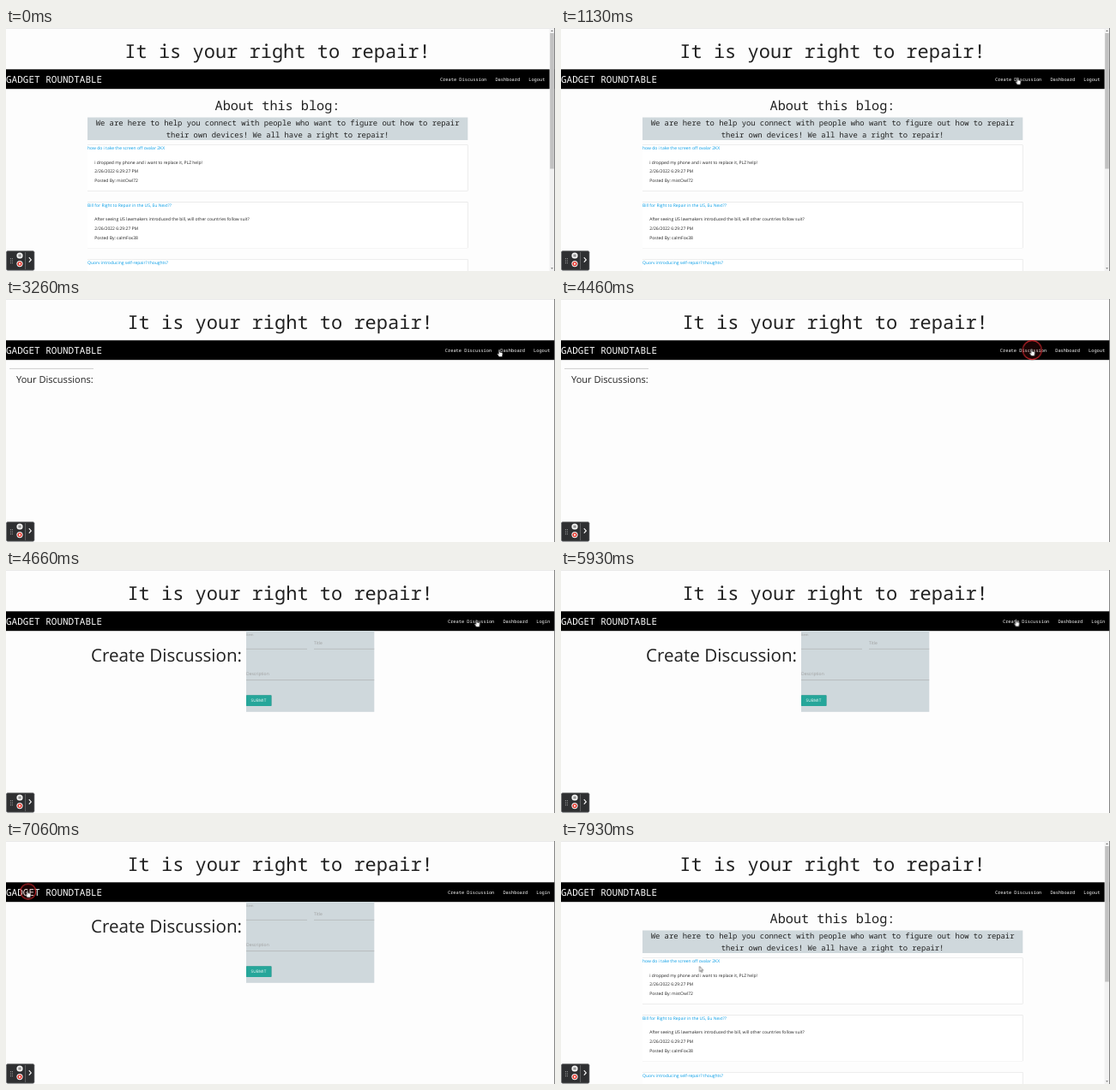
An HTML page for the animation above (8000 ms loop, 640x284 px).

```html
<!DOCTYPE html>
<html lang="en">
<head>
<meta charset="utf-8">
<title>Repair forum walkthrough</title>
<style>
  html, body { margin: 0; width: 100%; height: 100%; overflow: hidden; background: #fdfdfd; }
  svg { display: block; width: 100%; height: 100%; }
  text { font: 5px "Open Sans", "Noto Sans", sans-serif; fill: #212121; text-rendering: geometricPrecision; white-space: pre; }
  .mono text, text.mono { font-family: "Noto Sans Mono", "DejaVu Sans Mono", monospace; }
  .mid { text-anchor: middle; }
  text.hero { font-size: 22px; }
  text.about { font-size: 15.2px; }
  text.intro { font-size: 8.83px; }
  text.brand { font-size: 11px; fill: #fff; }
  .links text { font-size: 5.33px; fill: #fff; text-anchor: end; }
  text.link { fill: #039be5; }
  .card rect { fill: #fff; filter: drop-shadow(0 .7px .7px rgba(0, 0, 0, .32)); }
  .panel { fill: #cfd8dc; }
  .label { fill: #9e9e9e; }
  .rule { stroke: #9e9e9e; stroke-width: .5; }

  /* every animation shares one 8 s clock */
  .home, .dash, .create, .arrow, .hand, .pointer, .ring { animation: 8s linear infinite; }
  .home { animation-name: home; animation-timing-function: step-end; }
  .dash { animation-name: dash; animation-timing-function: step-end; }
  .create { animation-name: create; animation-timing-function: step-end; }
  .hand { animation-name: hand; animation-timing-function: step-end; }
  .arrow { animation-name: arrow; animation-timing-function: step-end; }
  .ring { animation-name: ring; animation-timing-function: step-end; fill: rgba(198, 30, 36, .12); stroke: #c3242a; stroke-width: 1.1; }
  .pointer { animation-name: move; }
  .pointer path { fill: #fff; stroke: #111; stroke-width: .5; stroke-linejoin: round; }

  @keyframes home {
    0% { visibility: visible; }
    31.625% { visibility: hidden; }
    90%, 100% { visibility: visible; }
  }
  @keyframes dash {
    0% { visibility: hidden; }
    31.625% { visibility: visible; }
    58.25%, 100% { visibility: hidden; }
  }
  @keyframes create {
    0% { visibility: hidden; }
    58.25% { visibility: visible; }
    90%, 100% { visibility: hidden; }
  }
  @keyframes move {
    0%, 2.5% { transform: translate(419px, 57.5px); }
    11.625%, 13.25% { transform: translate(528px, 57.5px); }
    23.25%, 43.25% { transform: translate(575px, 59px); }
    50.75%, 74.12% { transform: translate(548.5px, 58px); }
    74.125%, 75.75% { transform: translate(530.5px, 57.5px); }
    79% { transform: translate(300px, 43px); }
    83.25%, 90% { transform: translate(25px, 57.5px); }
    95.75% { transform: translate(280px, 90px); }
    99.125%, 100% { transform: translate(161.5px, 146.5px); }
  }
  @keyframes hand {
    0% { visibility: hidden; }
    9.35% { visibility: visible; }
    76% { visibility: hidden; }
    81.9% { visibility: visible; }
    92%, 100% { visibility: hidden; }
  }
  @keyframes arrow {
    0% { visibility: hidden; }
    .75% { visibility: visible; }
    9.35% { visibility: hidden; }
    76% { visibility: visible; }
    81.9% { visibility: hidden; }
    92%, 100% { visibility: visible; }
  }
  @keyframes ring {
    0% { r: 0; opacity: 0; }
    24.125% { r: 4px; opacity: 1; }
    25% { r: 9px; opacity: 1; }
    25.75% { r: 11.3px; opacity: 1; }
    28.25% { r: 6.3px; opacity: 1; }
    30% { r: 0; opacity: 0; }
    55.75% { r: 11px; opacity: 1; }
    58.25% { r: 0; opacity: 0; }
    85.75% { r: 3.5px; opacity: .75; }
    87.5% { r: 9px; opacity: 1; }
    88.4% { r: 11px; opacity: 1; }
    90%, 100% { r: 0; opacity: 0; }
  }
</style>
</head>
<body>
<svg viewBox="0 0 640 284">
  <rect width="640" height="284" fill="#fdfdfd"/>
  <path d="M0 .3H640" stroke="#d4d4d4" stroke-width=".6"/>
  <path d="M0 71.4H639" stroke="#000" stroke-opacity=".22" stroke-width="1"/>
  <rect y="48.3" width="639.3" height="22.7"/>

  <g class="home">
    <text class="mono hero mid" x="316.5" y="35">It is your right to repair!</text>
    <g class="links mono">
      <text x="560.3" y="61.7">Create Discussion</text>
      <text x="599.2" y="61.7">Dashboard</text>
      <text x="628.4" y="61.7">Logout</text>
    </g>
    <text class="mono about mid" x="316.5" y="95.5">About this blog:</text>
    <rect class="panel" x="95" y="104.5" width="443.3" height="26.5"/>
    <text class="mono intro mid" x="316.6" y="114.2">We are here to help you connect with people who want to figure out how to repair</text>
    <text class="mono intro mid" x="316.6" y="127.5">their own devices! We all have a right to repair!</text>

    <g class="card">
      <rect x="95" y="136.7" width="443.3" height="53.6"/>
      <text class="link" x="95" y="142.3">how do i take the screen off ovalar 2KX</text>
      <text x="103.3" y="158.5">i dropped my phone and i want to replace it, PLZ help!</text>
      <text x="103.3" y="169.2">2/26/2022 6:29:27 PM</text>
      <text x="103.3" y="179.9">Posted By: mistOwl72</text>
    </g>
    <g class="card">
      <rect x="95" y="203.5" width="443.3" height="53.6"/>
      <text class="link" x="95" y="209.1">Bill for Right to Repair in the US, Eu Next??</text>
      <text x="103.3" y="225.3">After seeing US lawmakers introduced the bill, will other countries follow suit?</text>
      <text x="103.3" y="236">2/26/2022 6:29:27 PM</text>
      <text x="103.3" y="246.7">Posted By: calmFox38</text>
    </g>
    <g class="card">
      <rect x="95" y="270.3" width="443.3" height="53.6"/>
      <text class="link" x="95" y="275.9">Quorv introducing self-repair? thoughts?</text>
    </g>

    <rect x="633.6" y=".6" width="5.7" height="283.4" fill="#f1f1f1"/>
    <rect x="634.2" y="6" width="4.6" height="158.5" fill="#c1c1c1"/>
    <path d="M635.2 4l1.3-1.6 1.3 1.6zM635.2 280.2l1.3 1.6 1.3-1.6z" fill="#606060"/>
  </g>

  <g class="dash">
    <text class="mono hero mid" x="319.6" y="35">It is your right to repair!</text>
    <g class="links mono">
      <text x="566.2" y="61.7">Create Discussion</text>
      <text x="605" y="61.7">Dashboard</text>
      <text x="634.2" y="61.7">Logout</text>
    </g>
    <path class="rule" d="M4 81.4H102"/>
    <text x="12" y="97.6" style="font-size:11.05px">Your Discussions:</text>
  </g>

  <g class="create">
    <text class="mono hero mid" x="319.6" y="35">It is your right to repair!</text>
    <g class="links mono">
      <text x="569.3" y="61.7">Create Discussion</text>
      <text x="608.2" y="61.7">Dashboard</text>
      <text x="634.2" y="61.7">Login</text>
    </g>
    <text x="99" y="107" style="font-size:20.6px">Create Discussion:</text>
    <rect class="panel" x="280" y="71" width="149.3" height="94.8"/>
    <text class="label" x="280" y="76.7" style="font-size:4px">Item</text>
    <text class="label" x="359" y="86.8">Title</text>
    <text class="label" x="280" y="123.4">Description</text>
    <path class="rule" d="M280 92.3H351M359 92.3H429.3M280 128.6H429.3"/>
    <rect x="280" y="146.3" width="29.5" height="12.6" rx=".7" fill="#26a69a" style="filter:drop-shadow(0 .7px .6px rgba(0,0,0,.3))"/>
    <text x="285.4" y="154.3" style="font-size:4.7px;letter-spacing:.17px;fill:#fff">SUBMIT</text>
  </g>

  <text class="mono brand" x="0" y="63.9">GADGET ROUNDTABLE</text>
  <path d="M639.6 0V284" stroke="#555" stroke-width=".8"/>

  <!-- recorder controls -->
  <rect x=".4" y="260.6" width="32.6" height="22.6" rx="1.6" fill="#2e2f31" stroke="#77797c" stroke-width=".7"/>
  <path d="M5.4 269.2V275.4M7.4 269.2V275.4" stroke="#b8b8b8" stroke-width=".9" stroke-dasharray="1 1.5"/>
  <circle cx="16" cy="266" r="3.6" fill="#f4f4f4"/>
  <path d="M15.1 264.5V267.5M16.9 264.5V267.5" stroke="#333" stroke-width=".8"/>
  <circle cx="16" cy="275.6" r="3.6" fill="#f4f4f4"/>
  <circle cx="16" cy="275.6" r="2.6" fill="#e5382e"/>
  <rect x="15" y="274.6" width="2" height="2" fill="#fff"/>
  <path d="M22.6 262V282" stroke="#77797c" stroke-width=".7"/>
  <path d="M26.8 268.2l2.5 2.7-2.5 2.7" fill="none" stroke="#fff" stroke-width="1.1"/>

  <g class="pointer">
    <circle class="ring" cx=".8" cy="1.6" r="0"/>
    <path class="arrow" d="M0 0V6.2L1.4 4.9 2.4 7.1 3.4 6.6 2.4 4.5H4.3Z"/>
    <path class="hand" d="M-.7 .6Q0-.5 .7 .6V3.2L3 3.6Q4.1 3.9 4 5L3.4 8.6H-.2L-2.2 5.5Q-2.4 4.5-1.5 4.7L-.7 5.5Z"/>
  </g>
</svg>
</body>
</html>
```
